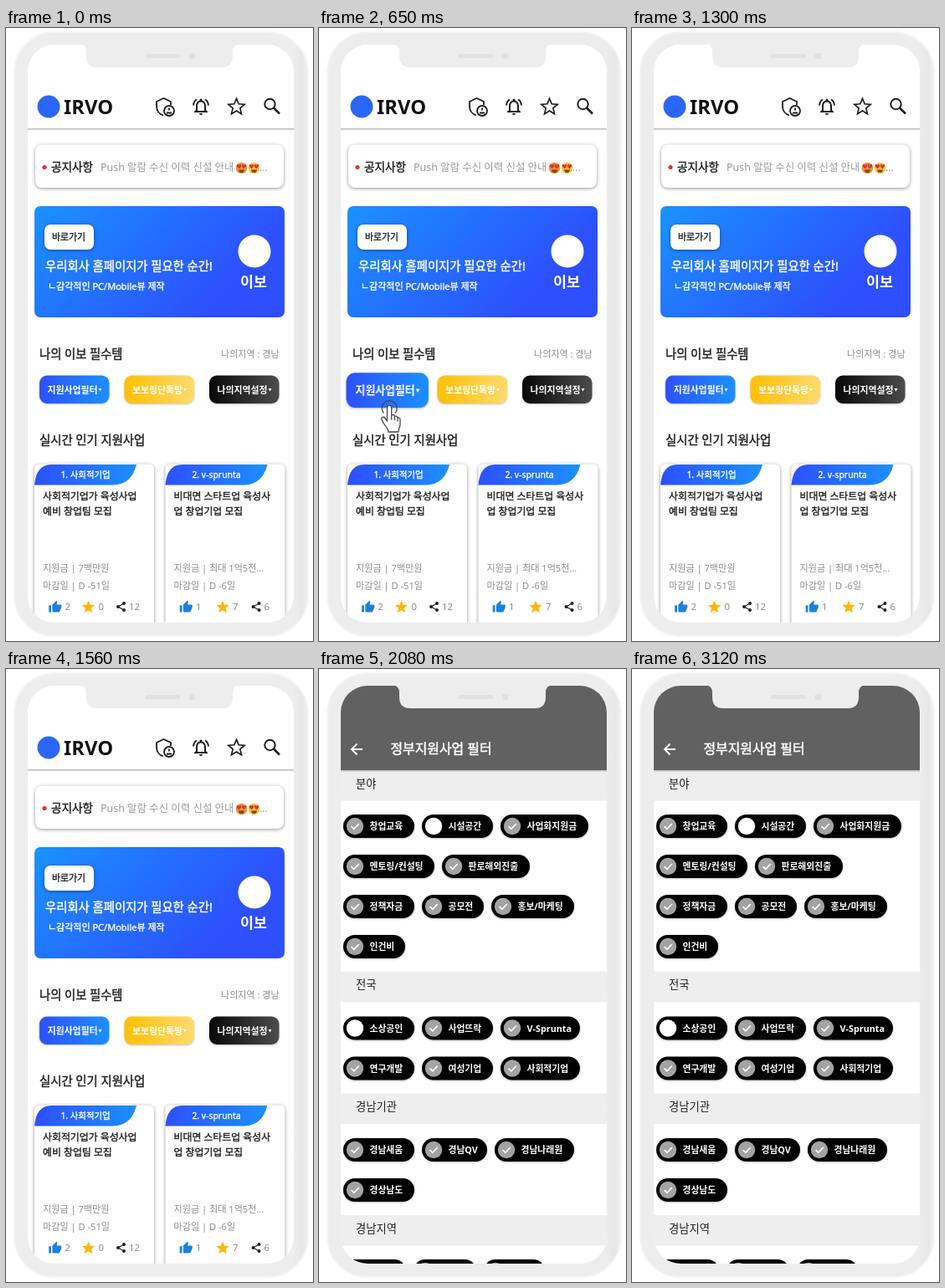
An HTML page that plays this animation: 367 by 733 pixels, repeating every 3250 ms.

```html
<!DOCTYPE html>
<html lang="ko">
<head>
<meta charset="utf-8">
<title>App demo</title>
<style>
  html, body { margin: 0; width: 100%; height: 100%; overflow: hidden; background: #fff; }
  svg { display: block; width: 100%; height: 100%; font-family: "Noto Sans", "Noto Sans CJK KR", "Noto Sans CJK", sans-serif; }
  .card { fill: #fff; filter: drop-shadow(.5px 1px 2px rgba(0,0,0,.42)); }
  .raised { filter: drop-shadow(0 1px 1px rgba(0,0,0,.25)); }
  .line { fill: none; stroke: #1d1d1d; stroke-width: 1.8; }
  #filter { opacity: 0; }
  #press { transform-origin: 82px 433px; }
  #hand { opacity: 0; }
</style>
</head>
<body>
<svg viewBox="0 0 367 733">
  <defs>
    <clipPath id="screen"><rect x="26" y="20" width="318" height="691" rx="32"/></clipPath>
    <linearGradient id="body"><stop offset=".95" stop-color="#ededed"/><stop offset=".98" stop-color="#e6e6e6"/><stop offset="1" stop-color="#f1f1f1"/></linearGradient>
    <linearGradient id="banner" x1="0" y1="0" x2=".92" y2=".4"><stop stop-color="#1a92ff"/><stop offset="1" stop-color="#2d4ffd"/></linearGradient>
    <linearGradient id="blue"><stop stop-color="#2d50fc"/><stop offset="1" stop-color="#1c90ff"/></linearGradient>
    <linearGradient id="yellow"><stop stop-color="#ffbf05"/><stop offset="1" stop-color="#ffda6c"/></linearGradient>
    <linearGradient id="black"><stop stop-color="#080808"/><stop offset="1" stop-color="#4c4c4c"/></linearGradient>
  </defs>
  <rect x="10" y="5" width="351" height="722" rx="48" fill="url(#body)" stroke="#f4f4f4" stroke-width="2"/>
  <g clip-path="url(#screen)">
    <rect x="26" y="20" width="318" height="691" fill="#fff"/>
    <g id="home"></g>
    <g id="filter"></g>
  </g>
  <path d="M88 19.500q8 0 8 9v5q0 13.500 13 13.500H258q13 0 13-13.500v-5q0-9 8-9Z" fill="#ededed"/>
  <rect x="166" y="31" width="42" height="5" rx="2.500" fill="#e1e1e1"/>
  <circle cx="222.500" cy="33.500" r="4" fill="#e1e1e1"/>
  <g id="hand" stroke="#444" stroke-width="1.300" stroke-linejoin="round" stroke-linecap="round">
    <path d="M77 460a9 9 0 1 1 14.500 0" fill="none"/>
    <path d="M81.500 470V454a2.600 2.600 0 0 1 5.200 0v9q3.300-1.500 3.800 1.500q3-1 3.500 1.500q3-.5 3 2.500v5c0 4-2 5-2 9.500H83c0-5-6-8-8-15c-.6-3 2.500-3.500 4-1.500ZM86.700 463v5M90.500 464.500v4M94 466v4" fill="#fff"/>
  </g>
</svg>
<script>
const $ = id => document.getElementById(id);
const text = (x, y, size, str, fill = '#222', weight = 400, anchor = 'start') =>
  `<text x="${x}" y="${y}" font-size="${size}" fill="${fill}" font-weight="${weight}" text-anchor="${anchor}">${str}</text>`;
// Hangul has no medium cut here, so a hairline outline thickens the regular one.
const medium = (x, y, size, str, fill = '#222', anchor) =>
  `<g stroke="${fill}" stroke-width="${size * .032}">${text(x, y, size, str, fill, 400, anchor)}</g>`;
const box = (x, y, w, h, r, attrs) =>
  `<rect x="${x}" y="${y}" width="${w}" height="${h}" rx="${r}" ${attrs}/>`;
const at = (x, y, content, scale = 1) => `<g transform="translate(${x} ${y}) scale(${scale})">${content}</g>`;
const dot = (x, y, r, fill) => `<circle cx="${x}" cy="${y}" r="${r}" fill="${fill}"/>`;

const STAR = 'M12 17.270L18.180 21l-1.640-7.030L22 9.240l-7.190-.61L12 2 9.190 8.630 2 9.240l5.460 4.730L5.820 21z';
const GRAY = '#8c8c8c';

const heart = (x, y) =>
  `<path transform="translate(${x} ${y})" d="M0 2.700C-4 0-3-2.600-1.300-2.400Q-.3-2.300 0-1.300Q.3-2.300 1.300-2.400C3-2.600 4 0 0 2.700Z" fill="#e0362e"/>`;
const emoji = (x, y, fill) => dot(x, y, 6.8, fill) + heart(x - 3, y - 2) + heart(x + 3, y - 2) +
  `<path d="M${x - 3.5} ${y + 2}h7q-.5 3.500-3.500 3.500t-3.500-3.500Z" fill="#7a4517"/>`;

const headerIcons = `
  <g class="line">
    <path d="M197 92V88l-8.500-4l-8.500 4v6c0 5 3.500 9 8 10.500"/>
    <circle cx="195" cy="99" r="6" fill="#fff"/>
    <path d="M195 95.500v3M192 101.500h6"/>
    <circle cx="315.500" cy="91" r="6.200" stroke-width="2"/>
    <path d="M320 95.500l7 7" stroke-width="2.500"/>
  </g>` +
  at(221, 82, `<path fill="#1d1d1d" d="M12 22c1.100 0 2-.9 2-2h-4c0 1.100.9 2 2 2zm6-6v-5c0-3.070-1.630-5.640-4.500-6.320V4a1.500 1.500 0 0 0-3 0v.68C7.640 5.360 6 7.920 6 11v5l-2 2v1h16v-1zm-2 1H8v-6c0-2.480 1.510-4.500 4-4.500s4 2.020 4 4.500zM7.580 4.080L6.150 2.650A10.300 10.300 0 0 0 2.030 10.500h2a8.300 8.300 0 0 1 3.550-6.420zm12.390 6.420h2a10.300 10.300 0 0 0-4.120-7.850l-1.420 1.430a8.300 8.300 0 0 1 3.540 6.420z"/>`) +
  at(264, 82.5, `<path class="line" d="${STAR}"/>`, .96);

const actionButton = (x, fill, label) =>
  box(x, 415.5, 83.5, 33.5, 9, `fill="url(#${fill})" class="raised"`) +
  text(x + 9.5, 436.5, 10.9, label, '#fff', 700) +
  `<path d="M${x + 70.5} 431h4l-2 3.500Z" fill="#fff"/>`;

const thumb = x => at(x, 684, `<path fill="#1c80e3" d="M1 21h4V9H1zM23 10c0-1.100-.9-2-2-2h-6.300l1-4.600v-.3c0-.4-.2-.8-.4-1.100L14.200 1 7.600 7.600C7.200 8 7 8.500 7 9v10c0 1.100.9 2 2 2h9c.8 0 1.500-.5 1.800-1.200l3-7.100c.1-.2.200-.5.200-.7z"/>`, .69);
const share = x => dot(x + 9, 688, 2, '#222') + dot(x + 2, 692, 2, '#222') + dot(x + 9, 696, 2, '#222') +
  `<path d="M${x + 9} 688l-7 4l7 4" fill="none" stroke="#222" stroke-width="1.200"/>`;

function projectCard(x, tag, lines, details, starX, shareX, counts) {
  return box(x, 521.5, 143, 210, 6, 'class="card"') +
    `<path d="M${x} 546.500Q${x + 2} 522 ${x + 20} 522H${x + 122}Q${x + 116} 546 ${x + 94} 546.500Z" fill="url(#blue)"/>` +
    medium(x + 61, 538, 10.4, tag, '#fff', 'middle') +
    lines.map((s, i) => medium(x + 10, 564 + 18 * i, 11.9, s)).join('') +
    details.map((s, i) => text(x + 10, 650 + 21 * i, 11.1, s, GRAY)).join('') +
    thumb(x + 16.5) + at(starX - 9.2, 683, `<path d="${STAR}" fill="#ffb70a"/>`, .77) + share(shareX) +
    [x + 36.5, starX + 12, shareX + 15].map((tx, i) => text(tx, 696, 11.3, counts[i], GRAY)).join('');
}

$('home').innerHTML =
  box(20, 20, 330, 100, 0, 'fill="#fff" style="filter:drop-shadow(0 1px 1px rgba(0,0,0,.4))"') +
  dot(51, 94, 13.5, '#2c66f8') + text(69, 102.5, 23.8, 'IRVO', '#111', 700) + headerIcons +

  box(35, 139.5, 297, 51.5, 8, 'class="card"') + dot(46, 166.5, 2.6, '#d8392b') +
  medium(54, 171, 13.6, '공지사항') +
  text(113, 171, 12.45, 'Push 알람 수신 이력 신설 안내', '#999') +
  emoji(281.5, 167.5, '#f2913c') + emoji(296.5, 167.5, '#fdc63a') + text(303, 171, 12, '...', '#999') +

  box(34, 213, 299, 133, 7, 'fill="url(#banner)"') +
  box(46, 235, 59, 30, 7, 'class="card"') + medium(55, 253.5, 10.9, '바로가기') +
  medium(47, 290, 14.35, '우리회사 홈페이지가 필요한 순간!', '#fff') +
  medium(50, 313, 11, 'ㄴ감각적인 PC/Mobile뷰 제작', '#fff') +
  dot(297, 267, 19.5, '#fff') + text(296, 309.5, 17.4, '이보', '#fff', 700, 'middle') +

  medium(40, 395, 14.3, '나의 이보 필수템') +
  text(326.5, 394, 11, '나의지역 : 경남', GRAY, 400, 'end') +
  `<g id="press">${actionButton(40, 'blue', '지원사업필터')}</g>` +
  actionButton(141.5, 'yellow', '보보링단톡방') + actionButton(243, 'black', '나의지역설정') +

  medium(40, 498, 14.35, '실시간 인기 지원사업') +
  projectCard(34, '1. 사회적기업', ['사회적기업가 육성사업', '예비 창업팀 모집'],
    ['지원금 | 7백만원', '마감일 | D -51일'], 98.5, 132, [2, 0, 12]) +
  projectCard(190.5, '2. v-sprunta', ['비대면 스타트업 육성사', '업 창업기업 모집'],
    ['지원금 | 최대 1억5천...', '마감일 | D -6일'], 259, 293.5, [1, 7, 6]);

// Each chip is [left, right, label]; a leading "-" marks it unchecked.
const sections = [
  [121, '분야'], [361.5, '전국'], [507.5, '경남기관'], [653, '경남지역']
];
const chipRows = [
  [188, [29, 114, '창업교육'], [123, 208, '-시설공간'], [217, 322, '사업화지원금']],
  [236, [29, 138, '멘토링/컨설팅'], [147, 252, '판로해외진출']],
  [284, [29, 114, '정책자금'], [123, 197, '공모전'], [206, 305, '홍보/마케팅']],
  [332, [29, 103, '인건비']],
  [429.5, [29, 114, '-소상공인'], [123, 208, '사업뜨락'], [217, 312, 'V-Sprunta']],
  [477.5, [29, 114, '연구개발'], [123, 208, '여성기업'], [217, 312, '사회적기업']],
  [575, [29, 114, '경남새움'], [123, 201, '경남QV'], [210, 305, '경남나래원']],
  [623, [29, 114, '경상남도']],
  [720, [29, 104, ''], [113, 188, ''], [197, 270, '']]
];

function chip(y, [left, right, label]) {
  const off = label.startsWith('-'), cx = left + 14;
  return box(left, y - 14, right - left, 28, 14, 'fill="#000" class="raised"') +
    dot(cx, y, 10.2, off ? '#fff' : '#a3a3a3') +
    (off ? '' : `<path d="M${cx - 4.5} ${y}l3.300 3.300l6-6.300" fill="none" stroke="#fff" stroke-width="1.600"/>`) +
    text(left + 31.5, y + 4, 10.8, label.replace(/^-/, ''), '#fff', 700);
}

$('filter').innerHTML =
  box(26, 20, 318, 691, 0, 'fill="#fff"') +
  sections.map(([y, name]) => box(26, y, 318, 36.5, 0, 'fill="#eee"') + text(44, y + 20.5, 13.3, name)).join('') +
  box(20, 20, 330, 101, 0, 'fill="#616161" class="raised"') +
  '<path d="M52 96H39.500M45.500 89.500L39 96l6.500 6.500" fill="none" stroke="#fff" stroke-width="1.900"/>' +
  medium(85.5, 100.5, 15.9, '정부지원사업 필터', '#fff') +
  chipRows.map(([y, ...chips]) => chips.map(c => chip(y, c)).join('')).join('');

const LOOP = 3250;
function play(id, steps, toFrame) {
  const frames = steps.map(([time, value]) => ({ offset: time / LOOP, easing: 'step-end', ...toFrame(value) }));
  frames.push({ ...frames[0], offset: 1 });
  $(id).animate(frames, { duration: LOOP, iterations: Infinity });
}
const fade = opacity => ({ opacity });
const press = [[0, 0], [260, .6], [390, 1], [1170, .5], [1300, 0]];

play('press', press, v => ({ transform: `translateY(${v}px) scale(${1 + .18 * v}, ${1 + .25 * v})` }));
play('hand', press, fade);
play('filter', [[0, 0], [2080, 1]], fade);
</script>
</body>
</html>
```
